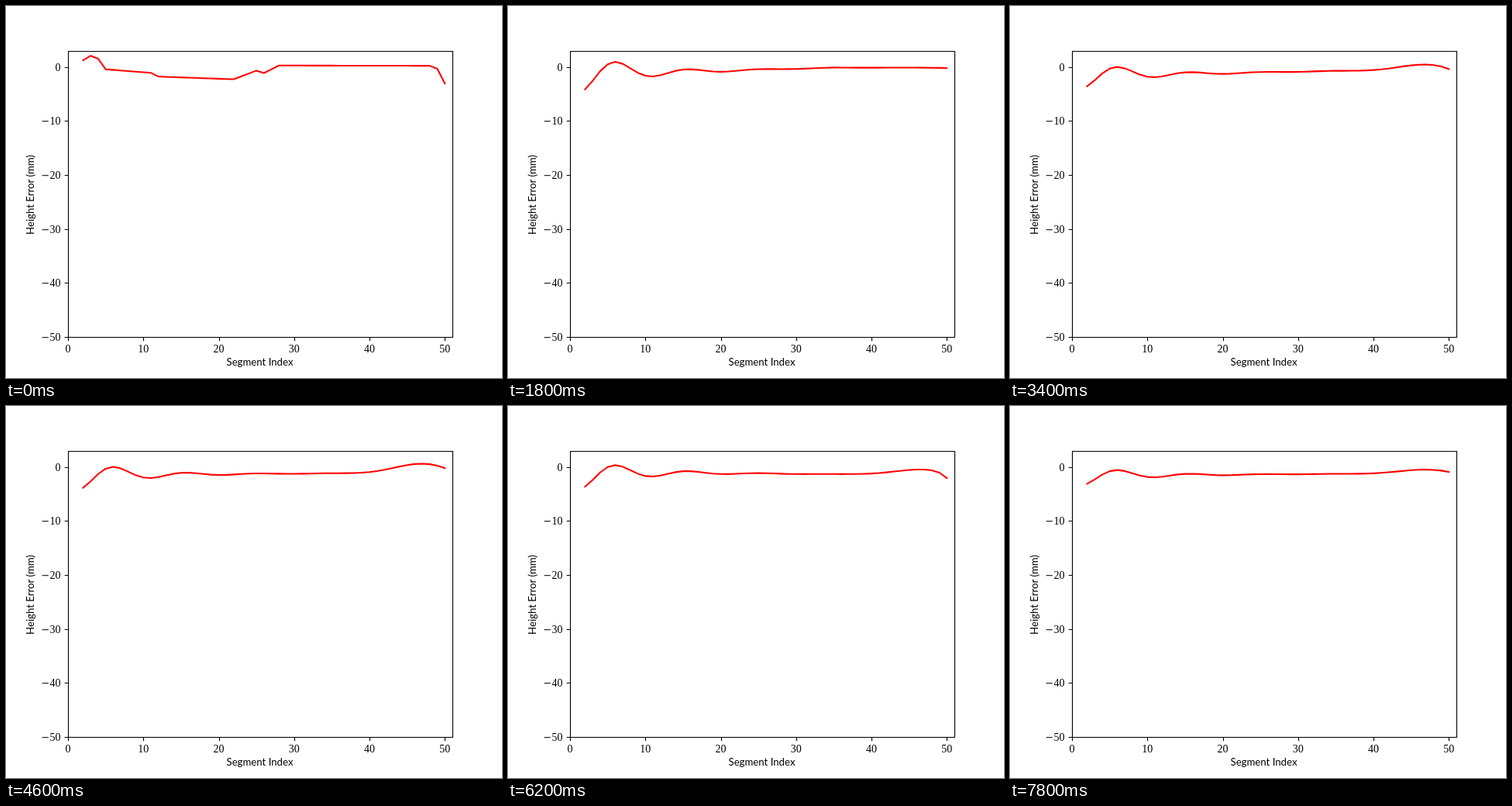
These frames come from a looping animation (640x480 px, 8 s). An HTML page:

```html
<!DOCTYPE html>
<html lang="en">
<head>
<meta charset="utf-8">
<title>Height error by segment</title>
<style>
  html, body { margin: 0; width: 100%; height: 100%; overflow: hidden; background: #fff; }
  svg { display: block; width: 640px; height: 480px; }
  .axes { fill: none; stroke: #000; stroke-width: 1.11; }
  .curve { fill: none; stroke: #f00; stroke-width: 2.08; stroke-linejoin: round; stroke-linecap: square; }
  .tick { font: 14px "Liberation Serif", serif; }
  .minus { font: 13px "DejaVu Serif", serif; }
  .label { font: 13.2px Lato, sans-serif; text-anchor: middle; }
</style>
</head>
<body>
<svg viewBox="0 0 640 480">
  <g id="ticks"></g>
  <polyline class="curve" id="curve"/>
  <path class="axes" d="M80.5 58.5H576.5V427.5H80.5Z"/>
  <text class="label" x="327.5" y="464">Segment Index</text>
  <text class="label" transform="translate(36 243.5) rotate(-90)">Height Error (mm)</text>
</svg>
<script>
const LOOP = 8000, STEP = 200, SETTLED = 1800;
const xOf = segment => 80 + segment * 496 / 51;
const yOf = mm => 57.6 + (3 - mm) * 369.6 / 53;
const snap = v => Math.floor(v + 0.5) + 0.5;
const clamp = v => Math.min(1, Math.max(0, v));
const lerp = (a, b, u) => a + (b - a) * u;

// Corners of the opening curve: segment, mm.
const opening = [
  [2, 1.2], [3, 2.05], [4, 1.5], [5, -.45], [11, -1.1], [12, -1.8], [22, -2.3],
  [25, -.7], [26, -1.15], [28, .25], [48, .2], [49, -.35], [50, -3.1]
];

// Character of the settled curve: time, swing, early level, late level, rise, drop.
const moods = [
  [SETTLED, 3.4, -.9, -.15, 0, -.1],
  [3400, 2.4, -1.3, -.75, 1.2, -.5],
  [4600, 2.6, -1.4, -1.2, 1.8, -.3],
  [5600, 2.4, -.9, -1.7, 1.7, -1.2],
  [7000, 3, -1.4, -.9, -.1, -1.6],
  [7800, 1.7, -1.5, -1.3, .8, -.2]
];

// Linear interpolation between rows that start with their position.
function between(rows, at) {
  let i = 0;
  while (i < rows.length - 2 && at >= rows[i + 1][0]) i++;
  const [a, b] = [rows[i], rows[i + 1]];
  const u = clamp((at - a[0]) / (b[0] - a[0]));
  return a.slice(1).map((v, k) => lerp(v, b[k + 1], u));
}

// A damped swing around a drifting level, a hump near the end and a final drop.
function settled(s, [swing, early, late, rise, drop]) {
  const n = s - 2;
  const ring = -swing * Math.exp(-.15 * n) * Math.cos(Math.PI * n / 4.8 + .3);
  const hump = rise * Math.exp(-(((s - 47) / 5) ** 2));
  return lerp(early, late, clamp((s - 15) / 20)) + ring + hump + drop * Math.exp(s - 50);
}

const curve = document.getElementById("curve");

function draw(time) {
  const mood = between(moods, time), points = [];
  // Segment 1 is measured only briefly, far below the rest.
  if (time >= 7200 && time < 7600) points.push([1, -15.1 - (time - 7200) / 120]);
  for (let s = 2; s <= 50; s++) {
    points.push([s, lerp(between(opening, s)[0], settled(s, mood), clamp(time / SETTLED))]);
  }
  curve.setAttribute("points",
    points.map(([s, mm]) => xOf(s).toFixed(2) + "," + yOf(mm).toFixed(2)).join(" "));
}

function drawTicks() {
  let marks = "", labels = "";
  for (let n = 0; n <= 50; n += 10) {
    const x = snap(xOf(n)), y = snap(yOf(-n));
    marks += `M${x} 427.5v4.86M80.5 ${y}h-4.86`;
    labels += `<text class="tick" x="${xOf(n)}" y="447" text-anchor="middle">${n}</text>`;
    labels += `<text class="tick" x="70.5" y="${y + 4}" text-anchor="end">` +
      (n ? `<tspan class="minus">−</tspan>` : "") + `${n}</text>`;
  }
  document.getElementById("ticks").innerHTML = `<path class="axes" d="${marks}"/>` + labels;
}

const start = performance.now();
let shown = -1;
function frame() {
  const elapsed = (performance.now() - start) % LOOP;
  const time = Math.floor(elapsed / STEP) * STEP;
  if (time !== shown) draw(shown = time);
  requestAnimationFrame(frame);
}
drawTicks();
frame();
</script>
</body>
</html>
```
